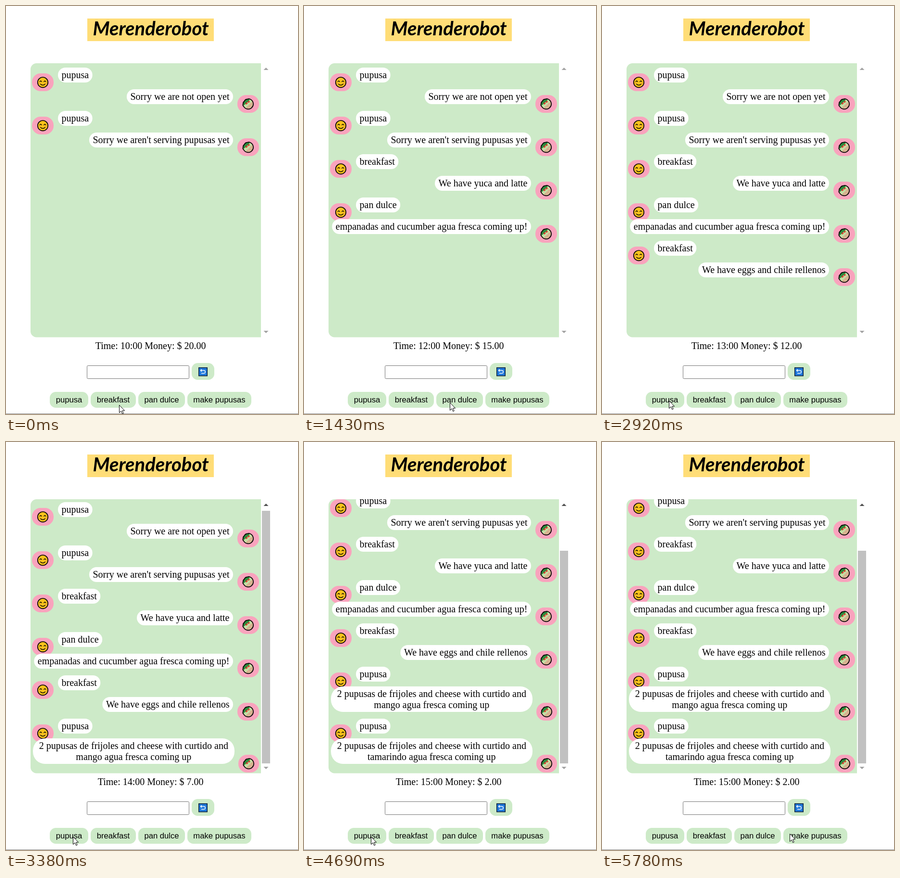
Animation of 607x848 px, one loop 5.88 s. Source, as an HTML page:

```html
<!DOCTYPE html>
<html lang="en">
<head>
<meta charset="utf-8">
<title>Merenderobot</title>
<style>
  html, body { margin: 0; width: 100%; height: 100%; overflow: hidden; background: #fff; }
  svg { display: block; width: 607px; height: 848px; }
  text { font: 20px "Liberation Serif", "Times New Roman", serif; fill: #000; white-space: pre; }
  .title { font: italic 700 40px Lato, sans-serif; }
  .label { font: 16.667px "Liberation Sans", Arial, sans-serif; }
  .mid { text-anchor: middle; }
  .green { fill: #cdeac8; }
  .pink { fill: #f9a3bd; }
  .white { fill: #fff; }
</style>
</head>
<body>
<svg viewBox="0 0 607 848">
  <defs>
    <clipPath id="view"><rect x="51" y="119" width="498" height="569.5" rx="12.5"/></clipPath>
    <clipPath id="round"><circle r="10.5"/></clipPath>
    <g id="smile" fill="none" stroke="#000" stroke-linecap="round">
      <circle r="10.7" fill="#fcc21b" stroke-width="1.7"/>
      <path d="M-6.3-1.4q2-3 4 0M2.3-1.4q2-3 4 0M-4.8 3.6q4.8 4.6 9.6 0" stroke-width="1.4"/>
      <path d="M-7.6 2h2M5.6 2h2" stroke="#f39a3c" stroke-width="2"/>
    </g>
    <g id="wrap">
      <circle r="10.7" fill="#d9b593"/>
      <g clip-path="url(#round)">
        <path d="M-12 10L-6 9L8-5L9-12H-12Z" fill="#c5dfa4"/>
        <path d="M-12 4L-8 2L2-7L4-12H-12Z" fill="#2c8a3c"/>
        <path d="M-5 0L3-6" stroke="#d8392b" stroke-width="3" stroke-dasharray="4 1.5"/>
        <path d="M2 4h1M6 0h1M-2 7h1M6 5h1" stroke="#b58a68" stroke-width="1.3"/>
      </g>
      <path d="M5-9.5A10.7 10.7 0 1 1-9.5 5Q-12 3-10.7 0Q-11-4-8-6Q-6-10-2-10Q2-12 5-9.5Z" fill="none" stroke="#000" stroke-width="1.7"/>
    </g>
  </defs>

  <rect width="607" height="848" class="white"/>
  <rect x="169" y="26" width="263" height="47" fill="#ffdd77"/>
  <text class="title mid" x="301" y="60.5">Merenderobot</text>

  <g clip-path="url(#view)">
    <rect x="51" y="119" width="479" height="570" class="green"/>
    <g id="chat"></g>
    <rect x="530" y="119" width="19" height="570" class="white"/>
  </g>
  <rect id="thumb" x="532" width="17" fill="#c1c1c1"/>
  <path id="up" d="M535.5 133l5-5l5 5Z"/>
  <path id="down" d="M535.5 675l5 5l5-5Z"/>

  <text id="status" class="mid" x="300.6" y="713"></text>
  <rect x="168.5" y="747.5" width="212" height="27" rx="2" fill="#fff" stroke="#767676"/>
  <rect x="386" y="742" width="47" height="35" rx="12.5" class="green"/>
  <rect x="400.7" y="751.7" width="17.6" height="17" fill="#2079dc" stroke="#0b1a30" stroke-width="1.4"/>
  <path d="M405 757.5h6.3a3 3 0 0 1 0 6H406M407 755l-2.5 2.5l2.5 2.5" fill="none" stroke="#fff" stroke-width="1.3"/>
  <g id="buttons"></g>
  <path d="M0 847.5H607" stroke="#8a8a8a"/>
  <path id="cursor" d="M.5.5V16.4L4.2 12.9L6.8 18.6L9.2 17.5L6.7 12H11.6Z" fill="#fff" stroke="#000"/>
</svg>
<script>
const LOOP = 5880, TICK = 120;
const TOP = 119, VIEW = 570, TRACK = 528;
const el = id => document.getElementById(id);

// when asked, price, order, reply lines
const talk = [
  [0, 0, "pupusa", "Sorry we are not open yet"],
  [0, 0, "pupusa", "Sorry we aren't serving pupusas yet"],
  [280, 3, "breakfast", "We have yuca and latte"],
  [1430, 2, "pan dulce", "empanadas and cucumber agua fresca coming up!"],
  [2490, 3, "breakfast", "We have eggs and chile rellenos"],
  [3380, 5, "pupusa", "2 pupusas de frijoles and cheese with curtido and", "mango agua fresca coming up"],
  [4570, 5, "pupusa", "2 pupusas de frijoles and cheese with curtido and", "tamarindo agua fresca coming up"]
].map(([start, price, ask, reply, more]) => ({ start, price, ask, reply, more }));

// pointer legs: start, steps, end point
const legs = [
  [670, 5, 303, 824], [1550, 5, 240, 824], [2800, 2, 139, 820], [5120, 1, 258, 814],
  [5240, 1, 161, 818], [5390, 1, 206, 805], [5510, 2, 310, 820], [5780, 1, 390, 814]
];

const pen = document.createElement("canvas").getContext("2d");
function measure(str, font) {
  pen.font = font;
  return pen.measureText(str).width;
}
const serif = str => measure(str, '20px "Liberation Serif", "Times New Roman", serif');
const sans = str => measure(str, '16.667px "Liberation Sans", Arial, sans-serif');

const pill = (x, y, w, h, r, cls) =>
  `<rect x="${x}" y="${y}" width="${w}" height="${h}" rx="${r}" class="${cls}"/>`;
const label = (x, y, str, cls = "") => `<text x="${x}" y="${y}" class="${cls}">${str}</text>`;
const face = (id, x, y, w = 45) =>
  pill(x, y, w, 37, 18, "pink") + `<use href="#${id}" x="${x + w / 2}" y="${y + 18.7}"/>`;

function bubble(x, y, str) {
  return pill(x, y, serif(str) + 15, 31, 15.5, "white") + label(x + 7.5, y + 22, str);
}

function longBubble(y, lines) {
  return pill(56, y, 419, 53, 25, "white") +
    lines.map((str, i) => label(265.3, y + 21.5 + 23 * i, str, "mid")).join("");
}

function drawRound({ ask, reply, more, y }) {
  const user = face("smile", 54, y + 12) + bubble(108, y, ask);
  const bot = more
    ? longBubble(y + 41, [reply, more]) + face("wrap", 483, y + 75, 43)
    : bubble(457 - serif(reply), y + 45, reply) + face("wrap", 481, y + 57);
  return `<g>${user}${bot}</g>`;
}

// stack the rounds and keep a running balance and scroll limit
let y = 128, money = 20;
for (const r of talk) {
  money -= r.price;
  Object.assign(r, { y, money, height: Math.max(VIEW, y + (r.more ? 114 : 94) - TOP) });
  y += r.more ? 108 : 90;
}
el("chat").innerHTML = talk.map(drawRound).join("");

let x = 91;
el("buttons").innerHTML = ["pupusa", "breakfast", "pan dulce", "make pupusas"].map(str => {
  const w = Math.round(sans(str) + 25), left = x;
  x += w + 5;
  return pill(left, 802, w, 33, 12.5, "green") + label(left + w / 2, 824, str, "label mid");
}).join("");

const rounds = [...el("chat").children];
const arrow = (id, on) => el(id).setAttribute("fill", on ? "#505050" : "#a3a3a3");
const move = (id, x, y) => el(id).setAttribute("transform", `translate(${x} ${y})`);
const stepsSince = (start, t) => Math.floor((t - start) / TICK) + 1;

function pointer(t) {
  let px = 235, py = 829;
  for (const [start, steps, tx, ty] of legs) {
    if (t < start) break;
    const p = Math.min(1, stepsSince(start, t) / steps);
    const e = p * p * (3 - 2 * p);
    px += (tx - px) * e;
    py += (ty - py) * e;
  }
  return [Math.round(px), Math.round(py)];
}

function draw(t) {
  const last = talk.findLastIndex(r => r.start <= t);
  const { start, height, money } = talk[last];
  const limit = height - VIEW;
  const scroll = Math.min(limit, talk[last - 1].height - VIEW + 68 * stepsSince(start, t));

  rounds.forEach((g, i) => g.setAttribute("visibility", i <= last ? "visible" : "hidden"));
  move("chat", 0, -scroll);
  el("status").textContent = `Time: ${9 + last}:00 Money: $ ${money.toFixed(2)}`;
  el("thumb").setAttribute("y", Math.round(140 + scroll / height * TRACK));
  el("thumb").setAttribute("height", limit ? Math.round(VIEW / height * TRACK) : 0);
  arrow("up", scroll > 0);
  arrow("down", scroll < limit);
  move("cursor", ...pointer(t));
}

function tick() {
  draw(performance.now() % LOOP);
  requestAnimationFrame(tick);
}
tick();
</script>
</body>
</html>
```
